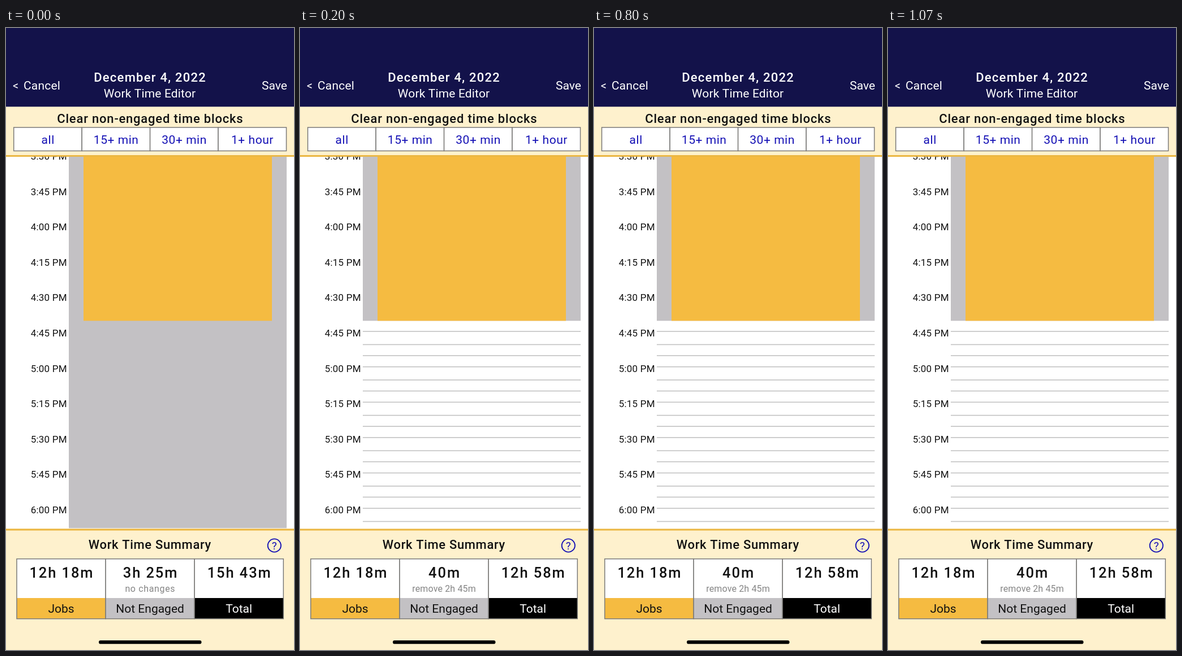
An HTML page with a canvas that plays this animation: 509 by 1101 pixels, repeating every 1170 ms.

```html
<!DOCTYPE html>
<html lang="en">
<head>
<meta charset="utf-8">
<title>Work Time Editor</title>
<style>
html, body { margin: 0; width: 100%; height: 100%; overflow: hidden; background: #fff; }
canvas { display: block; }
</style>
</head>
<body>
<canvas id="stage" width="509" height="1101"></canvas>
<script>
const ctx = document.getElementById('stage').getContext('2d');
const LOOP = 1170, CLEAR_AT = 200;
const NAVY = '#13124a', CREAM = '#fef1cd', ORANGE = '#f5bb41', RULE = '#ebb743',
      GREY = '#c3c1c4', BORDER = '#7b7a78', BLUE = '#1511b5', INK = '#111';
const QUARTER = 62.62;

function box(x, y, w, h, fill) {
  ctx.fillStyle = fill;
  ctx.fillRect(x, y, w, h);
}

function outline(x, y, w, h) {
  ctx.strokeStyle = BORDER;
  ctx.lineWidth = 1.5;
  ctx.strokeRect(x, y, w, h);
}

function text(str, x, y, { size = 21, weight = 400, color = INK, gap = 0, align = 'center' } = {}) {
  ctx.font = `${weight} ${size}px Roboto, "Open Sans", sans-serif`;
  ctx.letterSpacing = gap + 'px';
  ctx.textAlign = align;
  ctx.fillStyle = color;
  const trail = { left: 0, center: gap / 2, right: gap }[align];
  ctx.fillText(str, x + trail, y);
}

const heading = (str, x, y, gap, color) => text(str, x, y, { size: 22, weight: 500, gap, color });

function clock(minutes) {
  return `${Math.floor(minutes / 60)}:${String(minutes % 60).padStart(2, '0')} PM`;
}

function timeline(cleared) {
  box(0, 228, 509, 658, '#fff');
  if (cleared) {
    for (let i = 0; i < 6; i++)
      for (const offset of [0, 23.3, 42.8])
        box(111, 536.3 + i * QUARTER + offset, 385, 1.6, '#c2c2c2');
    box(0, 886, 509, 215, '#fff');
  }
  box(111, 227, 385, cleared ? 291.3 : 658.3, GREY);
  box(137, 227, 333, 291.3, ORANGE);
  for (let i = 0; i < 11; i++)
    text(clock(210 + 15 * i), 107.5, 232.9 + i * QUARTER, { size: 17, gap: 0.2, align: 'right' });
}

function header() {
  box(0, 0, 509, 139.5, NAVY);
  const white = { color: '#fff' };
  heading('December 4, 2022', 254, 94.5, 1.25, '#fff');
  text('Work Time Editor', 254, 123, { ...white, gap: 0.15 });
  text('<', 12, 108.5, { ...white, size: 20, align: 'left' });
  text('Cancel', 31, 108.5, { ...white, gap: 0.2, align: 'left' });
  text('Save', 497, 108.5, { ...white, align: 'right' });

  box(0, 139.5, 509, 86, CREAM);
  box(0, 225, 509, 2.8, RULE);
  heading('Clear non-engaged time blocks', 254.5, 168.3, 0.8);
  ['all', '15+ min', '30+ min', '1+ hour'].forEach((label, i) => {
    const x = 13.7 + i * 120.45;
    box(x, 176, 120.45, 41.5, '#fff');
    outline(x, 176, 120.45, 41.5);
    text(label, x + 60.2, 204.5, { color: BLUE, gap: 0.55 });
  });
}

function summary(cleared) {
  box(0, 886.5, 509, 214.5, CREAM);
  box(0, 886.5, 509, 3, RULE);
  heading('Work Time Summary', 254, 922, 0.65);

  ctx.strokeStyle = BLUE;
  ctx.lineWidth = 1.9;
  ctx.beginPath();
  ctx.arc(474.3, 916, 11.6, 0, 7);
  ctx.stroke();
  text('?', 474.3, 922.5, { size: 19, color: BLUE });

  const cells = [
    ['12h 18m', 'Jobs', ORANGE, INK],
    [cleared ? '40m' : '3h 25m', 'Not Engaged', GREY, INK],
    [cleared ? '12h 58m' : '15h 43m', 'Total', '#000', '#fff']
  ];
  cells.forEach(([amount, label, fill, color], i) => {
    const x = 19 + i * 157.1, mid = x + 78.5;
    box(x, 939.7, 157.1, 106, '#fff');
    box(x, 1009, 157.1, 36.7, fill);
    outline(x, 939.7, 157.1, 106);
    text(amount, mid, 972.8, { size: 25.5, weight: 500, gap: 1.9 });
    text(label, mid, 1035, { color });
  });
  const note = cleared ? 'remove 2h 45m' : 'no changes';
  text(note, 254.5, 997.5, { size: 16, color: '#858585', gap: cleared ? 0.15 : 0.65 });

  ctx.fillStyle = '#000';
  ctx.beginPath();
  ctx.roundRect(164, 1084, 181.5, 6.3, 3.1);
  ctx.fill();
}

const start = performance.now();
function frame() {
  const cleared = (performance.now() - start) % LOOP >= CLEAR_AT;
  timeline(cleared);
  header();
  summary(cleared);
  requestAnimationFrame(frame);
}
frame();
</script>
</body>
</html>
```
